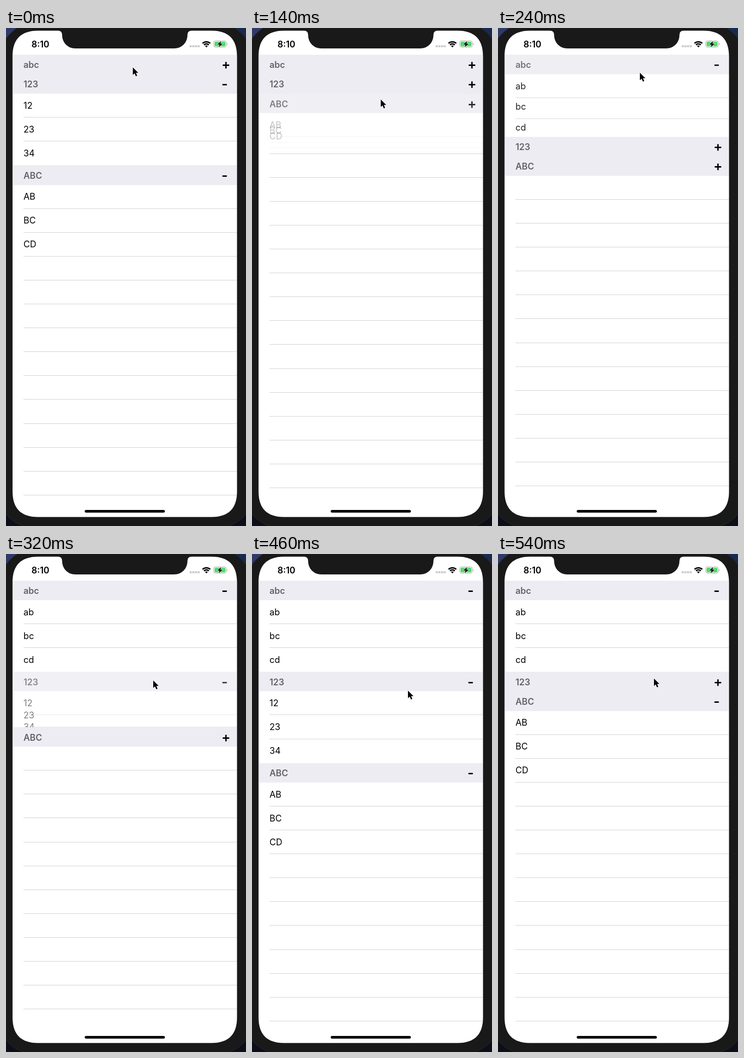
Write an HTML page that moves like this. It is 494 by 1024 pixels and loops after 0.58 s.

```html
<!DOCTYPE html>
<html lang="en">
<head>
<meta charset="utf-8">
<title>Collapsible list</title>
<style>
  html, body { margin: 0; width: 100%; height: 100%; overflow: hidden; background: #191919; }
  svg { display: block; width: 494px; height: 1024px; }
  text { font-family: Inter, "Liberation Sans", sans-serif; font-size: 18.2px; }
  .head text { font-size: 18px; font-weight: 600; fill: #636268; }
  .time { font-size: 18px; font-weight: 600; }
</style>
</head>
<body>
<svg viewBox="0 0 494 1024">
  <defs>
    <clipPath id="table"><rect x="14" y="54" width="461" height="913"/></clipPath>
  </defs>

  <!-- device -->
  <rect width="494" height="1024" fill="#191919"/>
  <g stroke="#29292c">
    <path d="M-2 25Q8 9 26 -2H-2Z" fill="#2f3a66"/>
    <path d="M496 25Q486 9 468 -2H496Z" fill="#182a50"/>
    <path d="M-2 996Q12 1018 42 1026H-2Z" fill="#0c0e1a"/>
    <path d="M496 996Q482 1018 452 1026H496Z" fill="#0c0e1a"/>
  </g>
  <path fill="#fff" d="M66 5.500H107Q115.500 5.500 115.500 14C115.500 30 127 42 143 42H346C362 42 373.500 30 373.500 14Q373.500 5.500 382 5.500H423C459 5.500 475.500 24 475.500 58V953C475.500 987 459 1005.500 423 1005.500H66C30 1005.500 13.500 987 13.500 953V58C13.500 24 30 5.500 66 5.500Z"/>

  <!-- status bar -->
  <text class="time" x="52.500" y="39.700">8:10</text>
  <path d="M378 37.500H399" stroke="#c9c9cb" stroke-width="4" stroke-dasharray="4.300 1.200"/>
  <g transform="translate(412.500 40)" fill="none" stroke="#000" stroke-width="2.800">
    <path d="M-8 -8.550A11.700 11.700 0 0 1 8 -8.550M-5 -5.300A7.300 7.300 0 0 1 5 -5.300"/>
    <path d="M0 0L-2.700 -2.900A4 4 0 0 1 2.700 -2.900Z" fill="#000" stroke="none"/>
  </g>
  <rect x="427.500" y="26.500" width="26" height="13" rx="3.800" fill="#fff" stroke="#a5a5a7"/>
  <rect x="429.300" y="28.300" width="22.400" height="9.400" rx="2.200" fill="#4cd964"/>
  <path d="M455 30.700Q457.600 33 455 35.300Z" fill="#a5a5a7"/>
  <path d="M442.800 26.800L434.800 34H439.400L437.800 39.400L446 32.200H441.400Z" stroke="#fff" stroke-width="1.200" paint-order="stroke"/>

  <g id="list" clip-path="url(#table)"></g>

  <rect x="162" y="991" width="165" height="5.500" rx="2.750"/>
  <path id="cursor" d="M0 0V15.500L3.700 12.200L6.300 18.200L9 17L6.400 11.200H11.300Z" stroke="#fff" stroke-width="1.600" stroke-linejoin="round" paint-order="stroke"/>
</svg>
<script>
const LOOP = 580, STEP = 20, SLIDE = 60;
const TOP = 54.7, HEAD = 40.2, ROW = 49.1;
const list = document.getElementById('list');
const cursor = document.getElementById('cursor');

// toggles: start time of each open/close slide
const sections = [
  { name: 'abc', rows: ['ab', 'bc', 'cd'], open: false, toggles: [193.35] },
  { name: '123', rows: ['12', '23', '34'], open: true, toggles: [20.5, 290, 475] },
  { name: 'ABC', rows: ['AB', 'BC', 'CD'], open: true, toggles: [98.8, 390] }
];

// time, x, y
const track = [
  [0, 261, 81], [20, 265, 101], [40, 267, 119], [60, 267, 121], [80, 267, 128],
  [100, 266, 142], [120, 265, 147], [140, 265, 147], [160, 270, 138], [180, 282, 106],
  [200, 291, 89], [240, 292, 92], [260, 295, 125], [280, 300, 235], [300, 303, 256],
  [320, 303, 260], [340, 304, 305], [360, 305, 371], [380, 310, 438], [400, 312, 446],
  [420, 314, 440], [440, 319, 350], [460, 321, 281], [480, 321, 258], [540, 321, 256]
];

function add(parent, tag, attrs, content) {
  const el = document.createElementNS('http://www.w3.org/2000/svg', tag);
  for (const key in attrs) el.setAttribute(key, attrs[key]);
  if (content) el.textContent = content;
  parent.appendChild(el);
  return el;
}
const bar = (parent, x, y, w, h, fill) =>
  add(parent, 'rect', { x, y, width: w, height: h, fill });
const move = (el, y) => el.setAttribute('transform', `translate(0 ${y})`);
const addLine = parent => bar(parent, 36, 0, 440, 1, '#d1d1d4');
const isLast = (items, i) => i === items.length - 1;

function build() {
  const blanks = add(list, 'g', {});
  const lines = Array.from({ length: 17 }, () => addLine(blanks));
  sections.forEach((s, n) => {
    s.cells = s.rows.map((label, i) => {
      const g = add(list, 'g', {});
      const text = add(g, 'text', { x: 36 }, label);
      // a row that touches the next header has no separator
      const line = isLast(s.rows, i) && !isLast(sections, n) ? null : addLine(g);
      return { g, text, line };
    });
  });
  for (const s of sections) {
    s.head = add(list, 'g', { class: 'head' });
    s.back = bar(s.head, 13, 0, 463, 40, '#edecf2');
    s.body = add(s.head, 'g', {});
    add(s.body, 'text', { x: 36, y: 27 }, s.name);
    s.plus = add(s.body, 'path', { d: 'M446 21.5H459.500M452.750 14.800V28.200', stroke: '#000', 'stroke-width': 2.9 });
    s.minus = bar(s.body, 445.5, 20, 9, 3, '#000');
  }
  return lines;
}
const lines = build();

const ease = u => u * u * (3 - 2 * u);

function state(s, t) {
  let open = s.open, p = 1;
  for (const start of s.toggles) {
    if (t <= start) break;
    open = !open;
    p = ease(Math.min(1, (t - start) / SLIDE));
  }
  return { open, p, size: open ? p : 1 - p };
}

function place(t) {
  let i = 0;
  while (i < track.length - 2 && track[i + 1][0] <= t) i++;
  const [t0, x0, y0] = track[i], [t1, x1, y1] = track[i + 1];
  const u = Math.min(1, (t - t0) / (t1 - t0));
  cursor.setAttribute('transform', `translate(${x0 + (x1 - x0) * u} ${y0 + (y1 - y0) * u})`);
}

function draw(t) {
  let y = TOP;
  sections.forEach((s, n) => {
    const { open, p, size } = state(s, t);
    const top = Math.round(y);
    move(s.body, Math.ceil(y));
    s.back.setAttribute('y', top);
    s.back.setAttribute('height', Math.round(y + HEAD) - top);
    s.head.setAttribute('opacity', 1 - p * (1 - p));
    const minus = open === p >= 0.5;
    s.minus.setAttribute('opacity', minus ? 1 : 0);
    s.plus.setAttribute('opacity', minus ? 0 : 1);
    y += HEAD;
    const alpha = open || isLast(sections, n) ? size : Math.max(0, 1 - 2 * p);
    s.cells.forEach((c, i) => {
      const cy = y + i * ROW * size;
      c.g.setAttribute('opacity', alpha);
      c.text.setAttribute('y', cy + 30.6);
      if (c.line) move(c.line, Math.round(cy + ROW - 1.1));
    });
    y += s.rows.length * ROW * size;
  });
  lines.forEach((line, i) => move(line, Math.round(y + (i + 1) * ROW - 1.1)));
  place(t);
}

function tick() {
  const t = performance.now() % LOOP;
  draw(Math.min(LOOP - 2 * STEP, Math.floor(t / STEP) * STEP));
  requestAnimationFrame(tick);
}
tick();
</script>
</body>
</html>
```
